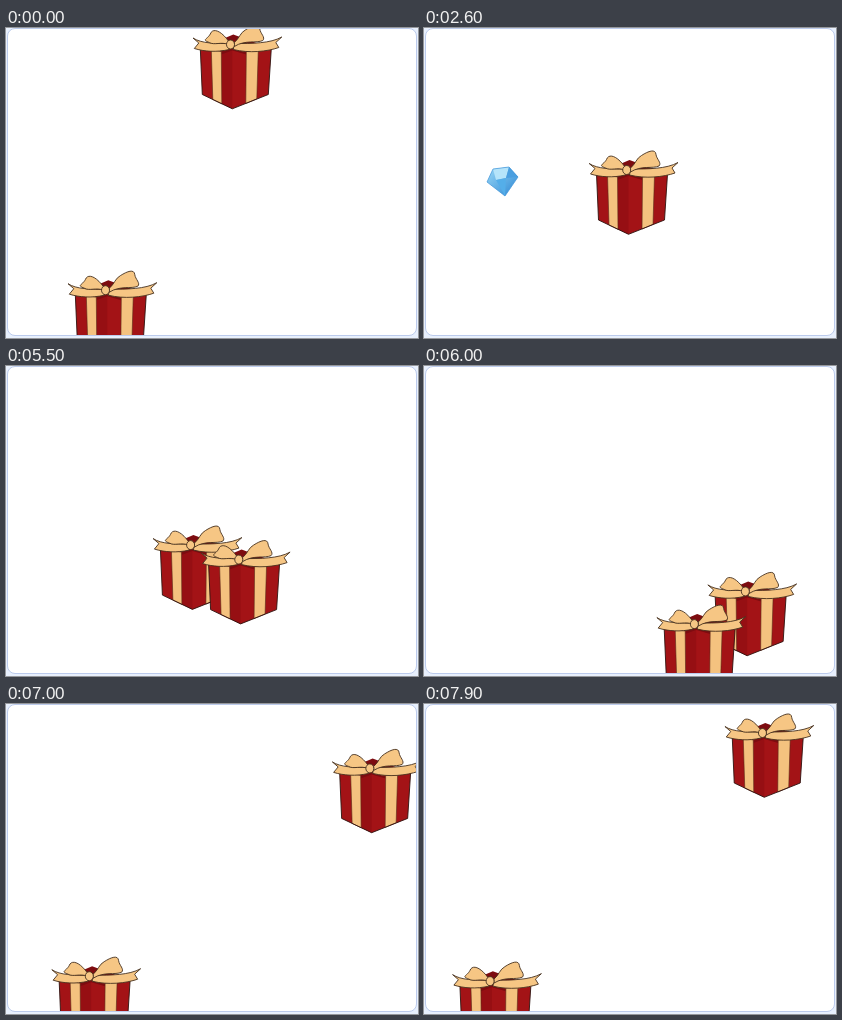
Write an HTML page that moves like this. It is 412 px wide and 310 px high and loops after 8000 ms.

```html
<!DOCTYPE html>
<html lang="en">
<head>
<meta charset="utf-8">
<title>Gift shuffle</title>
<style>
  html, body { margin: 0; height: 100%; overflow: hidden; background: #e8f0fd; }
  svg { display: block; width: 412px; height: 310px; }
</style>
</head>
<body>
<svg viewBox="0 0 412 310">
  <defs>
    <clipPath id="stage"><rect x="1.5" y=".5" width="409" height="307" rx="7.5"/></clipPath>
    <linearGradient id="ice" x2="1" y2="1">
      <stop stop-color="#9bd9f7"/><stop offset="1" stop-color="#2b86d3"/>
    </linearGradient>
    <!-- The gift is centred on the origin. -->
    <g id="gift" stroke-linejoin="round">
      <path fill="#7d0c10" d="M-37-19L-4-33L34-19L-5-13Z"/>
      <path fill="#a31316" d="M-37-19L-35 27L-5 41.3L31 27L34-19Z"/>
      <path fill="#960f13" d="M-16-15L-5-18V41.3L-16 36Z"/>
      <path fill="#7d0c10" d="M-16-20V-13L-5-17L9-13V-20Z"/>
      <path fill="#f4c27f" stroke="#5a2a16" stroke-width=".6"
        d="M-26-18L-24.5 32L-15.5 36.3L-16-16ZM9-16L8.5 36L19.5 31.3L21-18Z"/>
      <path fill="none" stroke="#2e1410" stroke-width=".9" d="M-37-19L-35 27L-5 41.3L31 27L34-19"/>
      <g fill="#f6c684" stroke="#46301f" stroke-width=".9">
        <path d="M-44.3-29.5C-36-24-22-24-9-24L-8-18C-21-15-33-16-43-19L-38.5-24.5Z"/>
        <path d="M44.5-30.5C33-24 15-24-3-24L-4-18C12-14 30-16 41.5-20L38.5-25Z"/>
        <path d="M-9-23C-16-26-23-22-28-25C-36-28-30-28-27-33.5C-25-39.5-17-38-8.5-26Z"/>
        <path d="M-3-25C2-29 3-35 8-37.5C15-42 22-44.5 22.5-38.5C23-34 28.5-30 25.5-27C19-24 8-28-3-21Z"/>
        <ellipse cx="-6.8" cy="-23" rx="4" ry="4.5"/>
      </g>
    </g>
  </defs>
  <rect x="1.5" y=".5" width="409" height="307" rx="7.5" fill="#fff"/>
  <g clip-path="url(#stage)">
    <g id="diamond">
      <path fill="url(#ice)" d="M69 141L85 139L94 149L81 168L63 154Z"/>
      <path fill="#b5e4fa" d="M69 141L85 139L82 150L72 152Z"/>
      <path fill="#54aee9" d="M72 152L82 150L81 168Z"/>
      <path fill="#4a9fe0" d="M85 139L94 149L82 150Z"/>
      <path fill="none" stroke="#3f94d8" stroke-width=".7" d="M69 141L85 139L94 149L81 168L63 154Z"/>
    </g>
    <use id="back" href="#gift"/>
    <use id="front" href="#gift"/>
  </g>
  <rect x="1.5" y=".5" width="409" height="307" rx="7.5" fill="none" stroke="#bccbec"/>
</svg>
<script>
const LOOP = 8000, STEP = 100, GLIDE = 1000;
const [back, front, diamond] = ['back', 'front', 'diamond'].map(id => document.getElementById(id));

// Each glide starts at its time and ends at the next point one second later.
const starts = [80, 5100, 6172, 7185];
const backPath = [[231.3, 39.5], [82, 165], [355.5, 257.7], [35, 303], [88, 299]];
const frontPath = [[106.3, 285.2], [209.5, 165], [284.7, 294], [388.5, 44.5], [328, 55]];

const clamp = v => Math.max(0, Math.min(1, v));

function place(gift, path, t) {
  let [x, y] = path[0];
  starts.forEach((start, i) => {
    const k = clamp((t - start) / GLIDE);
    x += k * (path[i + 1][0] - path[i][0]);
    y += k * (path[i + 1][1] - path[i][1]);
  });
  gift.setAttribute('transform', `translate(${x} ${y})`);
}

function draw(now) {
  const t = Math.floor((now % LOOP) / STEP) * STEP;
  place(back, backPath, t);
  place(front, frontPath, t);
  const hidden = clamp((t - 2000) / 600) - clamp((t - 4100) / 500);
  back.setAttribute('opacity', 1 - hidden);
  diamond.setAttribute('visibility', hidden > 0 ? 'visible' : 'hidden');
}

const begin = performance.now();
function tick() {
  draw(performance.now() - begin);
  requestAnimationFrame(tick);
}
tick();
</script>
</body>
</html>
```
